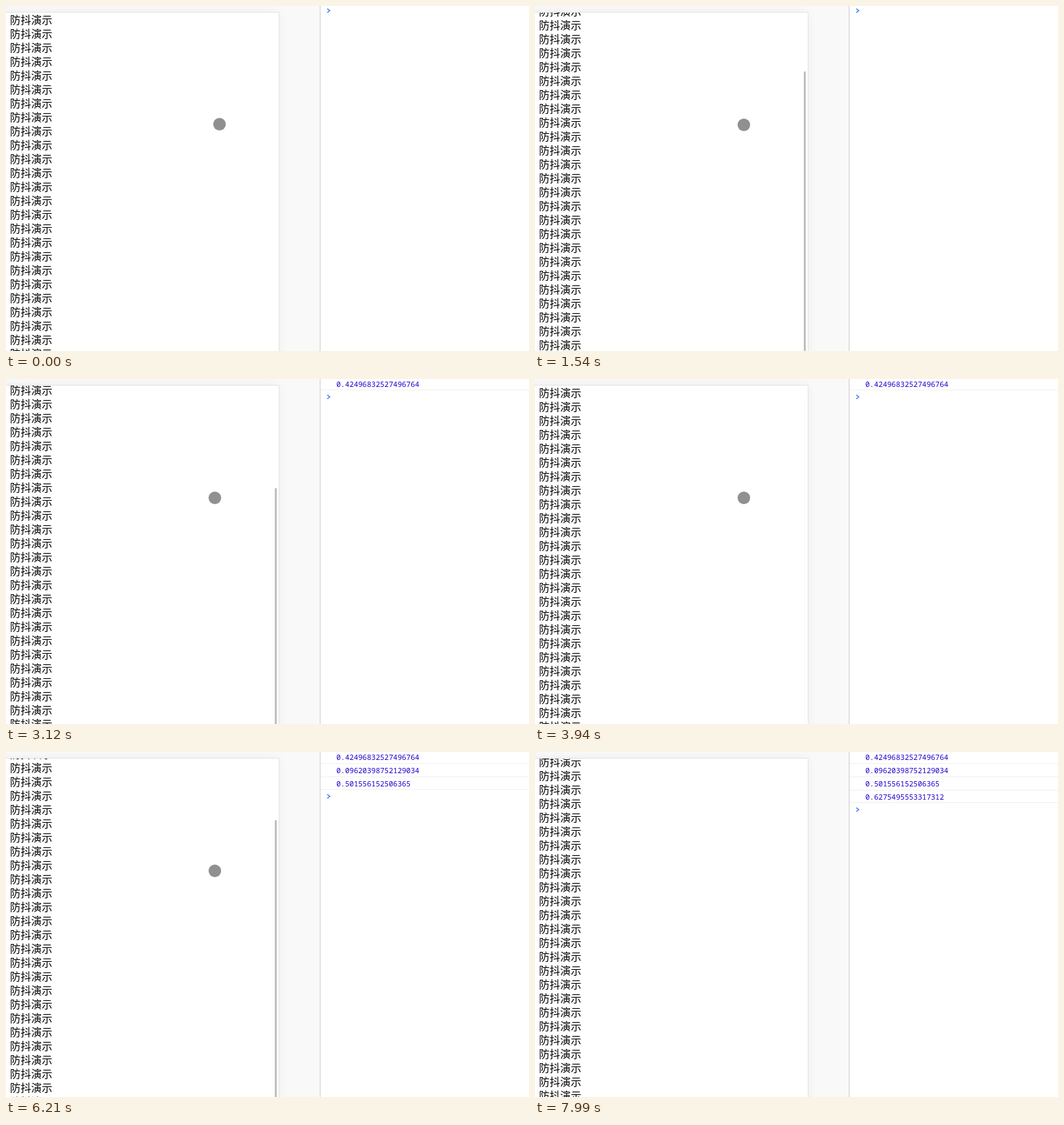
Write an HTML page that moves like this. It is 790 px wide and 521 px high and loops after 9570 ms.

```html
<!DOCTYPE html>
<html lang="zh-CN">
<head>
<meta charset="utf-8">
<title>防抖演示</title>
<style>
html, body { margin: 0; width: 100%; height: 100%; overflow: hidden; }
#stage { position: relative; width: 790px; height: 521px; overflow: hidden; background: #fff; }
#stage div, #stage svg { position: absolute; }
#side { left: 0; top: 0; width: 474px; height: 521px; background: #f9f9f9; border-right: 1px solid #ccc; overflow: hidden; }
#phone { left: -20px; top: 10px; width: 432px; height: 600px; background: #fff; box-shadow: 0 0 0 1px #e4e4e4, 0 0 14px rgba(0,0,0,.06); overflow: hidden; }
#rows { left: 26px; top: -21px; font: 16px/21px "Noto Sans CJK SC", "Noto Sans CJK", sans-serif; color: #000; white-space: pre; }
#bar { left: 406px; width: 3px; height: 700px; background: #bfbfbf; }
#disc { left: 0; top: 0; width: 19px; height: 19px; border-radius: 50%; background: #909090; }
.log { left: 499px; height: 16px; font: 11px/16px "Noto Sans Mono", monospace; color: #1c00cf; white-space: pre; }
.rule { left: 475px; width: 315px; height: 1px; background: #f0f0f0; }
#prompt { left: 484px; top: 3px; }
</style>
</head>
<body>
<div id="stage">
  <div id="side">
    <div id="phone"><div id="rows"></div></div>
    <div id="bar"></div>
  </div>
  <svg id="prompt" width="8" height="9" fill="none" stroke="#367cf1" stroke-width="1.5"><path d="M1.3 1L5 4L1.3 7"/></svg>
  <div id="disc"></div>
</div>
<script>
const LOOP = 9570, ROW = 21;
const FADE_DELAY = 370, FADE = 200, DEBOUNCE = 980;

// Each wheel gesture scrolls the page; its value is logged once the page rests
const wheels = [
  { start: 1415, end: 1720, by: 200, value: "0.42496832527496764" },
  { start: 3095, end: 3380, by: -200, value: "0.09620398752129034" },
  { start: 4705, end: 4930, by: 100, value: "0.501556152506365" },
  { start: 6195, end: 6550, by: 200, value: "0.6275495553317312" }
];

const $ = id => document.getElementById(id);
const ramp = (t, a, b) => Math.min(1, Math.max(0, (t - a) / (b - a)));
const smooth = p => p * p * (3 - 2 * p);
const move = (el, x, y) => el.style.transform = `translate(${x}px, ${y}px)`;

function add(cls, text, top) {
  const el = document.createElement("div");
  el.className = cls;
  el.textContent = text;
  el.style.top = top + "px";
  $("stage").insertBefore(el, $("prompt"));
  return el;
}

$("rows").textContent = Array(28).fill("防抖演示").join("\n");
const lines = wheels.map((w, i) => [add("log", w.value, i * 20), add("rule", "", 0)]);

function drawPage(t) {
  let y = ROW, shown = 0;
  for (const { start, end, by } of wheels) {
    // most of the way is done before the last short settling time
    y += by * smooth(ramp(t, start, start + (end - start) * .843));
    if (t >= start) shown = 1 - ramp(t, end + FADE_DELAY, end + FADE_DELAY + FADE);
  }
  y = Math.round(y);
  move($("rows"), 0, -(y % ROW));
  $("bar").style.top = Math.round(18.72 + .682 * y) + "px";
  $("bar").style.opacity = shown;
}

function drawPointer(t) {
  const nudge = ramp(t, 800, 1030), leave = ramp(t, 7730, 7990) ** 2;
  move($("disc"), Math.round(313 - 7 * nudge + 600 * leave), Math.round(169 + nudge + 500 * leave));
}

function drawConsole(t) {
  const count = wheels.filter(w => t >= w.end + DEBOUNCE).length;
  lines.forEach(([log, rule], i) => {
    log.style.display = rule.style.display = i < count ? "block" : "none";
    rule.style.top = 20 * i + (i === count - 1 ? 16 : 17) + "px";
  });
  move($("prompt"), 0, count * 20);
}

const start = performance.now();
function tick() {
  const t = (performance.now() - start) % LOOP;
  drawPage(t);
  drawPointer(t);
  drawConsole(t);
  requestAnimationFrame(tick);
}
tick();
</script>
</body>
</html>
```
